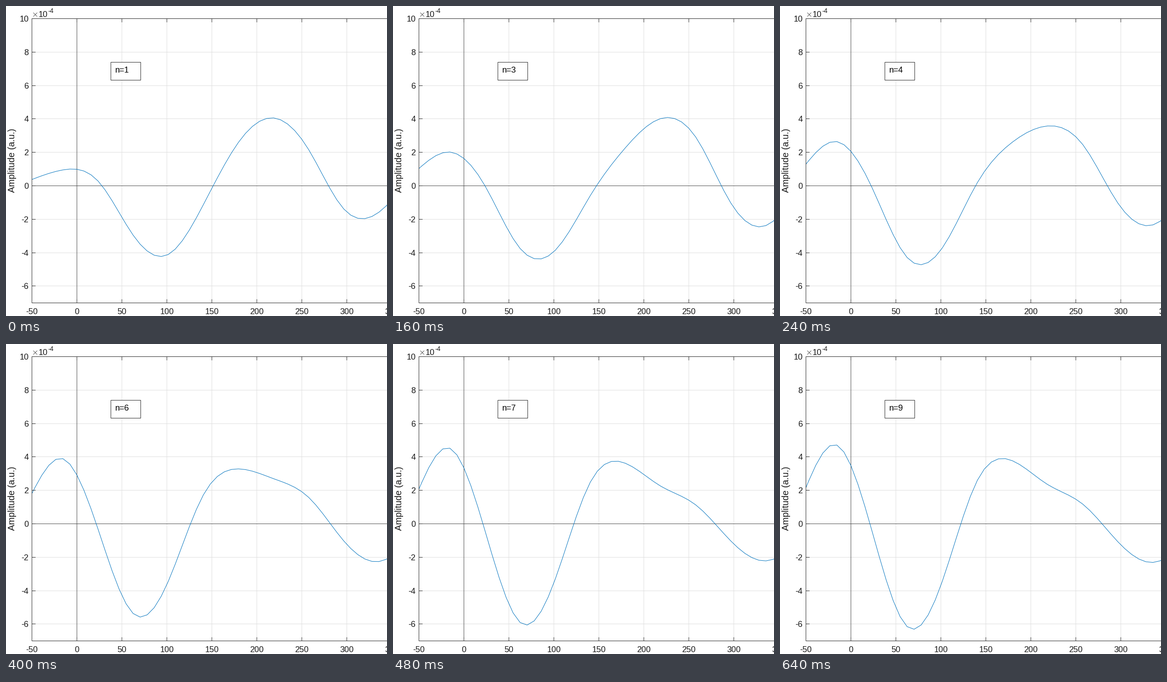
These frames come from a looping animation (830x675 px, 720 ms). A matplotlib script:

```python
import numpy as np
import matplotlib.pyplot as plt
from matplotlib.animation import FuncAnimation
from matplotlib.patches import Rectangle

W, H, DPI = 830, 675, 100
PX = 72 / DPI
LEFT, TOP, BOTTOM = 56.5, 27.5, 646.5
INK, TEXT, GRID, ZERO, BLUE = "#262626", "#1a1a1a", "#dedede", "#4a4a4a", "#0072bd"

STEP = 7.8125  # sampling interval
SAMPLES = np.arange(-7, 46)
KNOT_GAP = 5  # samples between the key points of a shape

# The running average drifts from the first shape to the settled one.
FIRST = [0.28, 0.95, 0.29, -2.95, -4.11, -1.13, 2.6, 4.06, 2.16, -1.39, -1.58, 0.9]
THIRD = [0.81, 2.02, 0, -3.75, -3.86, -0.58, 2.28, 4.02, 2.92, -1.03, -2.38, 0]
SETTLED = [1.55, 4.71, -0.43, -6.15, -3.45, 2.6, 3.77, 2.35, 1.18, -1.07, -2.31, -1]


def to_x(t):
    return 154.5 + 1.9585 * t


def to_y(v):
    return 391.5 - 36.41 * v


def pixel(p):
    return np.floor(p) + 0.5


def spline(v, u):
    """Natural cubic spline through values v at 0, 1, 2, ..."""
    inner = len(v) - 2
    system = 4 * np.eye(inner) + np.eye(inner, k=1) + np.eye(inner, k=-1)
    m = np.pad(np.linalg.solve(system, np.diff(v, 2)), 1)
    i = u.astype(int)
    b = u - i
    a = 1 - b
    return a * v[i] + b * v[i + 1] + (a**3 - a) * m[i] + (b**3 - b) * m[i + 1]


def average(n):
    """Amplitude at every sample after n trials."""
    early = np.interp(n, [1, 3], [0, 1])
    late = np.interp(n, [3, 7], [0, 1])
    gain = np.interp(n, [7, 8, 9], [0.96, 1.1, 1])
    tilt = np.interp(n, [7, 8, 9], [0, 0.0011, 0])
    first, third, settled = (
        spline(np.array(shape), (SAMPLES - SAMPLES[0]) / KNOT_GAP)
        for shape in (FIRST, THIRD, SETTLED))
    settled = settled * (gain - tilt * STEP * SAMPLES)
    start = first + early * (third - first)
    return start + late * (settled - start)


plt.rcParams["font.family"] = "Liberation Sans"
fig = plt.figure(figsize=(W / DPI, H / DPI), dpi=DPI, facecolor="white")
ax = fig.add_axes([0, 0, 1, 1])
ax.set(xlim=(0, W), ylim=(H, 0))
ax.axis("off")


def segment(x0, y0, x1, y1, color=INK, z=4):
    ax.plot([x0, x1], [y0, y1], color=color, lw=PX, zorder=z,
            solid_capstyle="butt", snap=False)


def write(x, y, text, size=18, color=TEXT, **kw):
    kw = {"va": "baseline", "zorder": 6, **kw}
    return ax.text(x, y, text, fontsize=size * PX, color=color, **kw)


for t in range(-50, 351, 50):
    x = pixel(to_x(t))
    write(to_x(t), 671, str(t), ha="center", clip_on=True)
    segment(x, TOP, x, BOTTOM, GRID, 1)
    segment(x, TOP, x, TOP + 8)
    segment(x, BOTTOM, x, BOTTOM - 8)
for v in range(-6, 11, 2):
    y = pixel(to_y(v))
    segment(LEFT, y, W, y, GRID, 1)
    segment(LEFT, y, LEFT + 8, y)
    write(49.5, y + 6.5, str(v), ha="right")

segment(to_x(0), TOP, to_x(0), BOTTOM, ZERO, 2)
segment(LEFT, to_y(0), W, to_y(0), ZERO, 2)
segment(LEFT, TOP, LEFT, BOTTOM)
segment(LEFT, TOP, W, TOP)
segment(LEFT, BOTTOM, W, BOTTOM)

# Axis exponent and title
segment(59.5, 14.5, 68, 23, "#555555")
segment(59.5, 23, 68, 14.5, "#555555")
write(71, 24, "10")
write(91.5, 15, "-4", 14)
write(13.5, 336, "Amplitude (a.u.)", 19.8, rotation=90, ha="center", va="center")

ax.add_patch(Rectangle((228.5, 122.5), 65, 39, fc="white", ec=INK, lw=PX,
                       zorder=5, snap=False))
label = write(237.5, 145, "", color="black")

curve, = ax.plot([], [], color=BLUE, lw=PX, zorder=3)
curve.set_clip_path(Rectangle((LEFT, TOP), W - LEFT, BOTTOM - TOP,
                              transform=ax.transData))


def update(frame):
    n = frame + 1
    curve.set_data(to_x(STEP * SAMPLES), to_y(average(n)))
    label.set_text(f"n={n}")
    return curve, label


anim = FuncAnimation(fig, update, frames=9, interval=80, repeat=True,
                     repeat_delay=0)
plt.show()
```
